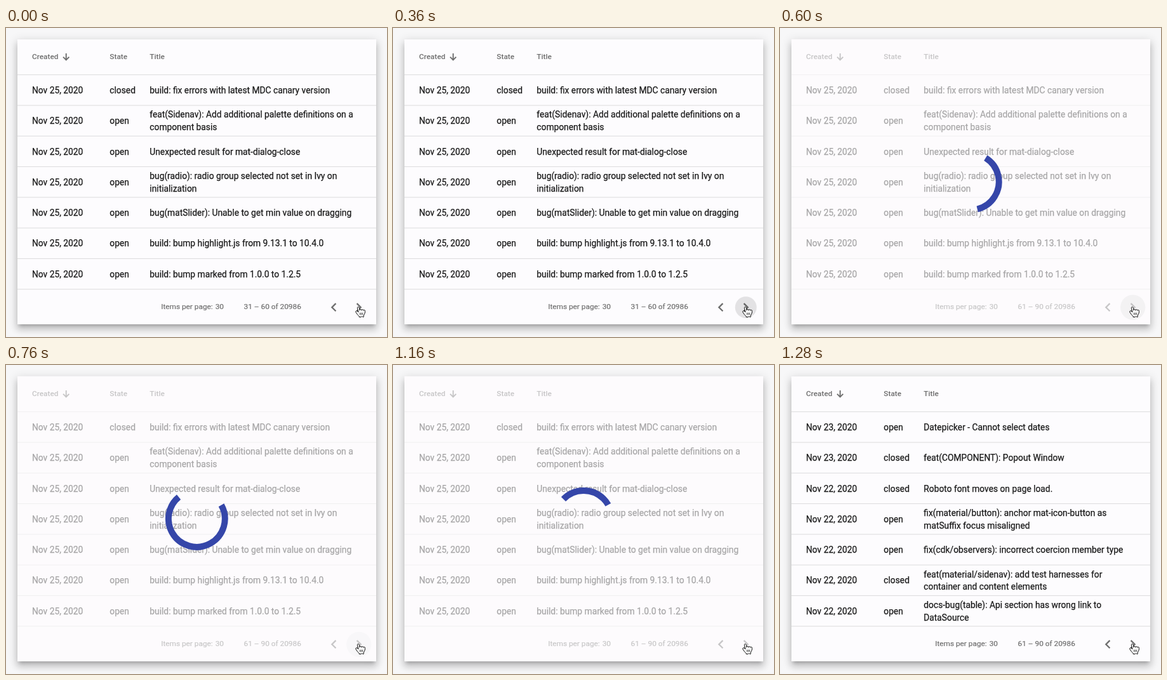
These frames come from a looping animation (600x487 px, 1400 ms). An HTML page:

```html
<!DOCTYPE html>
<html lang="en">
<head>
<meta charset="utf-8">
<title>Paged issue table</title>
<style>
  html, body { margin: 0; width: 100%; height: 100%; overflow: hidden; background: #f7f7f8; }
  .card {
    position: absolute; left: 18px; top: 17.5px; width: 565px; height: 449.7px; background: #fdfcfe;
    box-shadow: 0 5px 5px -3px rgba(0,0,0,.2), 0 8px 10px 1px rgba(0,0,0,.14), 0 3px 14px 2px rgba(0,0,0,.12);
  }
  svg { position: absolute; left: 0; top: 0; }
  text { font: 13.8px Roboto, sans-serif; fill: #1a1a1a; stroke: #1a1a1a; stroke-width: .25px; white-space: pre; }
  .head text { font-size: 11.83px; font-weight: 500; fill: #6e6e6e; stroke: none; }
  .foot text { font-size: 11.83px; fill: #6e6e6e; stroke: #6e6e6e; stroke-width: .2px; }
  .icon { fill: #6e6e6e; }
</style>
</head>
<body>
<div class="card"></div>
<svg width="600" height="487" viewBox="0 0 600 487">
  <g class="head">
    <text x="41" y="49.2">Created</text>
    <text x="163.3" y="49.2">State</text>
    <text x="226.3" y="49.2">Title</text>
    <path d="M94.7 40V50M90 45.7l4.7 4.7 4.7-4.7" fill="none" stroke="#6e6e6e" stroke-width="1.9"/>
  </g>
  <g id="lines" fill="#dcdcdd"></g>
  <g id="before"></g>
  <g id="after"></g>
  <g class="foot">
    <text x="244.2" y="443.4">Items per page:</text>
    <text x="329.7" y="443.4">30</text>
    <text x="374.6" y="443.4" id="range"></text>
    <path class="icon" transform="translate(502.5 426.4) scale(1.15)" d="M15.41 7.41L14 6l-6 6 6 6 1.41-1.41L10.83 12z"/>
    <path class="icon" transform="translate(541.9 426.4) scale(1.15)" d="M10 6L8.59 7.41 13.17 12l-4.58 4.59L10 18l6-6z"/>
  </g>
  <circle id="ripple" cx="555.7" cy="440.2"/>
  <rect id="shade" x="18" y="17.5" width="565" height="449.7" fill="#fdfcfe" opacity=".62"/>
  <circle id="spinner" cx="300.3" cy="242.4" r="44.4" pathLength="360" fill="none" stroke="#3546a9" stroke-width="9.9"/>
  <g transform="translate(542.2 431.3)" stroke="#000" stroke-linejoin="round">
    <path fill="#fff" stroke-width=".95" d="M11.3 20.4L8.7 16.6Q7.9 15 9.8 14.4Q10.8 14.4 12.8 16.6L11.2 10.4Q10.8 8.4 12.4 8.2
      Q13.8 8.2 14.3 10.8L14.8 13.6Q14.9 12.2 16.2 12.1Q17.6 12.2 17.9 13.8Q17.9 12.4 19.2 12.3Q20.6 12.3 20.9 14
      Q21.4 12.8 22.6 13.2Q23.3 13.4 23.2 15Q23.4 18.2 22.2 19.6Q20.6 21.4 20.9 24.2H19.6L18.4 22.9 17.2 24.2H13.9Q14.2 22.8 12.9 22Z"/>
    <path stroke-width=".75" d="M15.4 17.4v3.5M17.4 17.4v3.5M19.4 17.4v3.5"/>
  </g>
</svg>
<script>
const LOOP = 1400, STEP = 40;
const LOADING = 400, SPIN = 440, LOADED = 1240, PRESS = 240;
const TOP = 73.3, ROW = 48.29, LEADING = 19.72;
const el = id => document.getElementById(id);
const clamp = v => Math.min(1, Math.max(0, v));

// Each row: day of November, state, title ("|" breaks the line).
const oldRows = [
  [25, "closed", "build: fix errors with latest MDC canary version"],
  [25, "open", "feat(Sidenav): Add additional palette definitions on a|component basis"],
  [25, "open", "Unexpected result for mat-dialog-close"],
  [25, "open", "bug(radio): radio group selected not set in Ivy on|initialization"],
  [25, "open", "bug(matSlider): Unable to get min value on dragging"],
  [25, "open", "build: bump highlight.js from 9.13.1 to 10.4.0"],
  [25, "open", "build: bump marked from 1.0.0 to 1.2.5"]
];
const newRows = [
  [23, "open", "Datepicker - Cannot select dates"],
  [23, "closed", "feat(COMPONENT): Popout Window"],
  [22, "closed", "Roboto font moves on page load."],
  [22, "open", "fix(material/button): anchor mat-icon-button as|matSuffix focus misaligned"],
  [22, "open", "fix(cdk/observers): incorrect coercion member type"],
  [22, "closed", "feat(material/sidenav): add test harnesses for|container and content elements"],
  [22, "open", "docs-bug(table): Api section has wrong link to|DataSource"]
];

const label = (x, y, s) => `<text x="${x}" y="${y.toFixed(2)}">${s}</text>`;

function rowMarkup([day, state, title], i) {
  const y = TOP + ROW * (i + 0.5) + 5.55;
  const parts = title.split("|");
  return label(41, y, `Nov ${day}, 2020`) + label(163.3, y, state) +
    parts.map((s, k) => label(226.3, y + (k - (parts.length - 1) / 2) * LEADING, s)).join("");
}

el("before").innerHTML = oldRows.map(rowMarkup).join("");
el("after").innerHTML = newRows.map(rowMarkup).join("");
el("lines").innerHTML = Array.from({ length: 8 }, (_, i) =>
  `<rect x="18" y="${(TOP - 0.1 + ROW * i).toFixed(2)}" width="565" height="1"/>`).join("");

// CSS-style cubic-bezier(x1, y1, x2, y2), solved by bisection.
function bezier(x1, y1, x2, y2) {
  const at = (a, b, s) => 3 * a * s * (1 - s) ** 2 + 3 * b * s * s * (1 - s) + s ** 3;
  return x => {
    let lo = 0, hi = 1;
    for (let i = 0; i < 24; i++) {
      const mid = (lo + hi) / 2;
      if (at(x1, x2, mid) < x) lo = mid; else hi = mid;
    }
    return at(y1, y2, lo);
  };
}
const spinEase = bezier(0.35, 0, 0.25, 1);
const rippleEase = bezier(0, 0, 0.2, 1);

function show(id, visible) {
  el(id).style.display = visible ? "" : "none";
}

// The arc grows from 5% to 80% in 500 ms, then its tail catches up.
function drawSpinner(t) {
  const age = t - SPIN;
  const growing = age < 500;
  const e = spinEase(clamp((growing ? age : age - 500) / 500));
  const sweep = 360 * (growing ? 0.05 + 0.75 * e : 0.8 - 0.75 * e);
  const start = growing ? 0 : 287.5 - sweep;
  const turn = (t - 422) * 0.18;
  el("spinner").setAttribute("stroke-dasharray", `${sweep} 360`);
  el("spinner").setAttribute("transform", `rotate(${start + turn - 90} 300.3 242.4)`);
}

function draw(t) {
  const loading = t >= LOADING && t < LOADED;
  show("before", t < LOADED);
  show("after", t >= LOADED);
  show("shade", loading);
  show("spinner", t >= SPIN && t < LOADED);
  el("range").textContent = (t < LOADING ? "31 – 60" : "61 – 90") + " of 20986";
  el("ripple").setAttribute("r", 19.7 * rippleEase(clamp((t - PRESS) / 225)));
  el("ripple").setAttribute("opacity", t > PRESS ? 0.1 * (1 - clamp((t - 600) / 300)) : 0);
  if (t >= SPIN) drawSpinner(t);
}

function tick() {
  const t = performance.now() % LOOP;
  draw(Math.floor(t / STEP) * STEP);
  requestAnimationFrame(tick);
}
tick();
</script>
</body>
</html>
```
